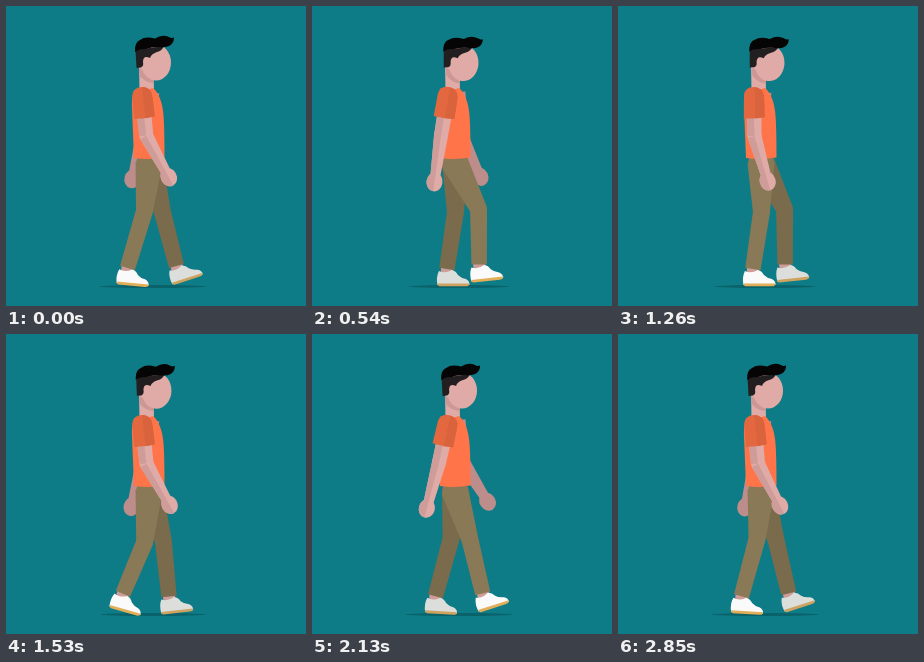
An HTML page with a canvas for the animation above (2880 ms loop, 300 by 300 pixels).

```html
<!DOCTYPE html>
<html lang="en">
<head>
<meta charset="utf-8">
<title>Walk cycle</title>
<style>
  html, body { margin: 0; width: 100%; height: 100%; overflow: hidden; background: #0d7c86; }
  canvas { display: block; width: 300px; height: 300px; }
</style>
</head>
<body>
<canvas id="stage" width="300" height="300"></canvas>
<script>
const ctx = document.getElementById('stage').getContext('2d');
const CYCLE = 1440, TAU = Math.PI * 2, DEG = Math.PI / 180;

const shape = {
  neck: new Path2D('M133 58L133.500 84Q140 90 148 84L147.500 66Z'),
  chinShade: new Path2D('M133 62L147.500 70L147.500 77Q138 76 133 69Z'),
  sideHair: new Path2D('M129.500 44L158 40Q156 45 151 46Q145 48 144 52Q137 49 137 56Q138 60 135 61.500L130.500 62Z'),
  topHair: new Path2D('M129 46Q128.500 36 134 34Q139 30 149 32.500Q156 28 163 31Q165 32.500 168 31.500Q168 37 164 39.500Q160 42 153 41Q145 41 140 43Q133 43 129 46Z'),
  shirt: new Path2D('M133.500 81.500Q140 85 147 82C152 86 156 95 157 105Q158.500 115 158.500 151.500Q143 154 128 152L126 102Q125 84 133.500 81.500Z'),
  sleeve: new Path2D('M-10 1Q-9 -7 0 -7Q9 -6 10 2L10.500 23.500Q0 25 -10.500 24Z'),
  sleeveShade: new Path2D('M1 -7Q9 -6 10 2L10.500 23.500L1 24.500Z'),
  shoe: new Path2D('M-8 2Q-2 5 5 1Q9 2 11 6Q14 9 19 10Q23 12 22.500 16L-9.500 16Q-11 8 -8 2Z'),
  sole: new Path2D('M-9.500 14.500L22.500 14.500Q22.500 17.300 19 17.300L-7.500 17.300Q-9.500 17 -9.500 14.500Z')
};

// phase, knee x, knee y, ankle x, ankle y, foot tilt
const stride = [
  [0, 156.5, 206, 170.5, 260, -18],
  [.08, 157.5, 207, 161, 263, -4],
  [.167, 156, 208, 153, 263, 0],
  [.25, 150, 208, 149, 263, 0],
  [.375, 143.5, 206, 135, 263, 0],
  [.5, 138.5, 205, 121.5, 262, 5],
  [.58, 139, 209, 116, 259, 19],
  [.667, 141.5, 213, 113, 256, 35],
  [.75, 146, 214, 115, 255, 42],
  [.81, 158, 207, 140, 252, 18],
  [.875, 166.5, 203, 167, 258.5, -6],
  [.94, 162, 204, 169, 258.5, -13]
];

function strideKey(i) {
  const n = stride.length, turn = Math.floor(i / n), key = stride[i - turn * n];
  return [key[0] + turn, ...key.slice(1)];
}

// Smooth periodic curve through the stride keys.
function strideAt(phase) {
  const p = phase - Math.floor(phase);
  let i = 0;
  while (strideKey(i + 1)[0] <= p) i++;
  const [a, b, c, d] = [-1, 0, 1, 2].map(k => strideKey(i + k));
  const span = c[0] - b[0], u = (p - b[0]) / span, v = 1 - u;
  return b.slice(1).map((y, k) => {
    k++;
    const m0 = (c[k] - a[k]) / (c[0] - a[0]) * span;
    const m1 = (d[k] - b[k]) / (d[0] - b[0]) * span;
    return v * v * (1 + 2 * u) * y + u * v * v * m0 + u * u * (3 - 2 * u) * c[k] - u * u * v * m1;
  });
}

function fill(path, color) {
  ctx.fillStyle = color;
  ctx.fill(path);
}

function ellipse(x, y, rx, ry, color, from = 0, to = TAU) {
  ctx.fillStyle = color;
  ctx.beginPath();
  ctx.ellipse(x, y, rx, ry, 0, from, to);
  ctx.fill();
}

function placed(x, y, degrees, draw) {
  ctx.save();
  ctx.translate(x, y);
  ctx.rotate(degrees * DEG);
  draw();
  ctx.restore();
}

// Tapered bar from one joint to the next; w0 and w1 are half widths.
function limb(x0, y0, w0, x1, y1, w1, color) {
  const a = Math.atan2(y1 - y0, x1 - x0), nx = -Math.sin(a), ny = Math.cos(a);
  ctx.fillStyle = color;
  ctx.beginPath();
  ctx.moveTo(x0 + nx * w0, y0 + ny * w0);
  ctx.lineTo(x1 + nx * w1, y1 + ny * w1);
  ctx.lineTo(x1 - nx * w1, y1 - ny * w1);
  ctx.lineTo(x0 - nx * w0, y0 - ny * w0);
  ctx.fill();
}

function leg(phase, hipX, color, shoe, sole) {
  const [kx, ky, ax, ay, tilt] = strideAt(phase);
  placed(ax, ay, tilt, () => {
    ctx.fillStyle = '#cf9c98';
    ctx.fillRect(-6, -4, 12, 10);
    fill(shape.shoe, shoe);
    fill(shape.sole, sole);
  });
  ellipse(hipX, 158, 13, 13, color);
  limb(hipX, 157, 13.5, kx, ky, 8.5, color);
  ellipse(kx, ky, 8.5, 8.5, color);
  limb(kx, ky, 8.5, ax, ay, 7.7, color);
}

// Lingers at both ends, a little longer at the back.
const armSwing = t => Math.sin(1.5 * (Math.cos(TAU * (t - .0625)) - .12));

function arm(x, y, swing, reach, near) {
  const upper = -3 + 9.5 * swing, fore = (reach - 15 + (reach + 15) * swing) / 2;
  const ex = x + 42 * Math.sin(upper * DEG), ey = y + 42 * Math.cos(upper * DEG);
  const skin = near ? '#e0aba7' : '#bd8d8b', shade = '#ce9d9a';
  limb(x, y, 7.5, ex, ey, 7, skin);
  ellipse(ex, ey, 7, 7, skin);
  if (near) limb(x - 4, y, 3.5, ex - 3.5, ey, 3.5, shade);
  placed(ex, ey, -fore, () => {
    limb(0, 0, 7, 0, 40, 5, skin);
    ellipse(0, 47, 8, 9.5, skin);
    if (!near) return;
    limb(-3.5, 0, 3.5, -2.5, 40, 2.5, shade);
    ellipse(0, 47, 8, 9.5, shade, Math.PI / 2, Math.PI * 1.5);
  });
  if (near) placed(x, y, -upper, () => {
    fill(shape.sleeve, '#e3683f');
    fill(shape.sleeveShade, '#d9633d');
  });
}

function head(tilt) {
  fill(shape.neck, '#e0aba7');
  placed(140, 84, tilt, () => {
    ctx.translate(-140, -84);
    fill(shape.chinShade, '#cc9794');
    ellipse(150, 56.5, 15, 18, '#e0aba7');
    fill(shape.sideHair, '#231f20');
    fill(shape.topHair, '#050505');
  });
}

function draw(now) {
  const t = now % CYCLE / CYCLE, sway = Math.cos(2 * TAU * t), swing = armSwing(t);
  ctx.fillStyle = '#0d7c86';
  ctx.fillRect(0, 0, 300, 300);
  ellipse(147, 280.5, 50.5 + 3.5 * sway, 1.5, '#0a626b');
  arm(146, 86, -swing, 32, false);
  leg(t, 143.5, '#796b4c', '#dcdedb', '#cda35f');
  leg(t + .5, 143, '#8a7956', '#fafafa', '#e2ae58');
  head(3.2 * (1 - sway));
  fill(shape.shirt, '#ff7449');
  arm(136, 88, swing, 30, true);
}

const start = performance.now();
function frame() {
  draw(performance.now() - start);
  requestAnimationFrame(frame);
}
frame();
</script>
</body>
</html>
```
